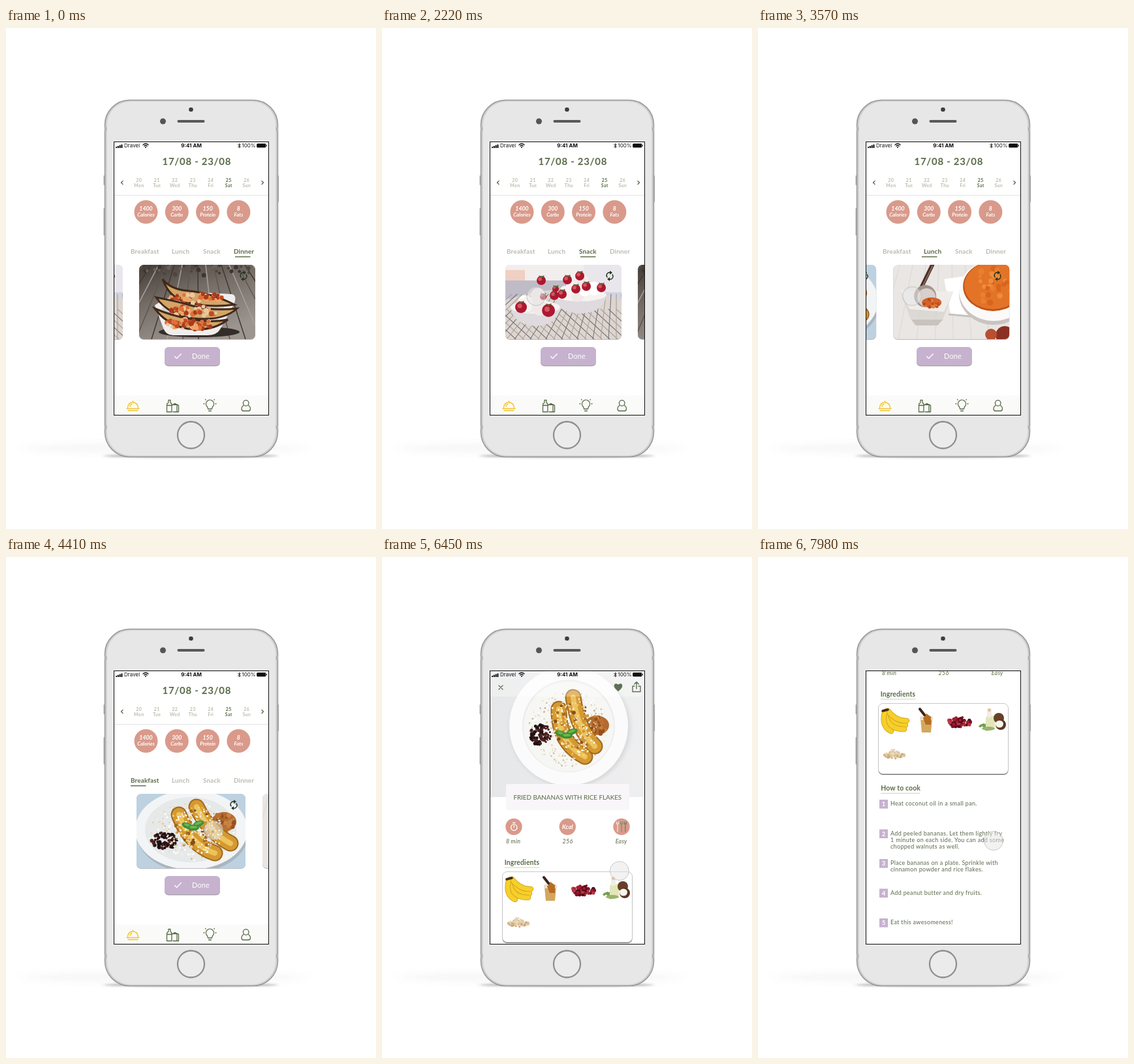
Recreate the animation shown at these times as an HTML page. Size 567 px wide and 768 px high, loop 8 s.

```html
<!DOCTYPE html>
<html lang="en">
<head>
<meta charset="utf-8">
<title>Meal planner</title>
<style>
html, body { margin: 0; height: 100%; overflow: hidden; background: #fff; }
svg { display: block; font-family: Lato, sans-serif; fill: none; }
text { fill: #586a46; white-space: pre; }
.mid { text-anchor: middle; }
.bar { font: 8px Inter, sans-serif; fill: #111; }
.b { font-weight: 700; }
.i { font-style: italic; }
.pale { fill: #b9beb0; }
.white { fill: #fff; }
.title { font-size: 15px; letter-spacing: .7px; }
.day { font-size: 7px; letter-spacing: .3px; }
.tab { font-size: 10px; letter-spacing: .1px; }
.step { font-size: 9px; letter-spacing: .32px; fill: #59684a; }
.head { font-size: 10.4px; letter-spacing: .15px; }
.line { stroke: #586a46; stroke-width: 1.3; stroke-linecap: round; stroke-linejoin: round; }
</style>
</head>
<body>
<svg id="stage" width="567" height="768" viewBox="0 0 567 768"></svg>
<script>
let seed = 7;
const rnd = () => (seed = seed * 16807 % 2147483647) / 2147483647;

// Markup helpers
const text = (x, y, s, cls = '', more = '') => `<text x="${x}" y="${y}" class="${cls}" ${more}>${s}</text>`;
const path = (d, fill, more = '') => `<path d="${d}" fill="${fill}" ${more}/>`;
const curve = (d, color, w) => `<path d="${d}" stroke="${color}" stroke-width="${w}" stroke-linecap="round" stroke-linejoin="round"/>`;
const oval = (x, y, rx, ry, fill, more = '') => `<ellipse cx="${x}" cy="${y}" rx="${rx}" ry="${ry}" fill="${fill}" ${more}/>`;
const disc = (x, y, r, fill, more) => oval(x, y, r, r, fill, more);
const rect = (x, y, w, h, fill, r = 0, more = '') => `<rect x="${x}" y="${y}" width="${w}" height="${h}" rx="${r}" fill="${fill}" ${more}/>`;
const group = (id, s, more = '') => `<g id="${id}" ${more}>${s}</g>`;
const repeat = (n, fn) => Array.from({ length: n }, (_, i) => fn(i)).join('');
const scatter = (n, x, y, rx, ry, r, ...colors) => repeat(n, () => {
  const a = rnd() * 6.283, d = Math.sqrt(rnd());
  return disc((x + Math.cos(a) * d * rx).toFixed(1), (y + Math.sin(a) * d * ry).toFixed(1),
    (r * (.6 + rnd() * .6)).toFixed(1), colors[rnd() * colors.length | 0]);
});

// Banana dish, shared by the card and the recipe photo
const dish = (berries, butter, mint, bananas, cx, cy, rx, ry) =>
  scatter(330, cx, cy, rx, ry, 1.3, '#e6d9c0', '#cbb896', '#fff', '#f3ecdc') +
  scatter(85, ...berries, 2.5, '#2a1414', '#4d2020', '#1d1012') +
  oval(...butter, 19, 15, '#b5692d') + scatter(40, ...butter, 17, 14, 3, '#c98344', '#95501f', '#bb7030') +
  bananas.map(d => curve(d, '#a2681f', 25) + curve(d, '#d49a31', 21) + curve(d, '#edc35b', 8)).join('') +
  scatter(55, cx + 8, cy - 3, rx * .5, ry * .7, 2.4, '#a8681f', '#8a4c18', '#cf9235', '#eec463') +
  scatter(190, cx + 5, cy, rx * .65, ry * .85, 1.3, '#fff', '#f7efd9', '#e6d6b2') +
  [[-9, 1, 20], [8, -2, -20], [0, 4, 0]].map(([x, y, a]) =>
    `<g transform="translate(${mint[0] + x} ${mint[1] + y}) rotate(${a})">${oval(0, 0, 9, 4.5, '#3f8f35')}${oval(0, -1, 6, 2, '#6cb551')}</g>`).join('');

const berry = (x, y, r = 7) => disc(x, y, r, '#ac1830') + disc(x - 2, y - 2, r * .4, '#d65560') +
  curve(`M${x - 3} ${y - r}l3 2l4-2`, '#4d7a3a', 1.5);
const bowl = (x, y, w) => path(`M${x - w} ${y}q4 27 ${w} 29q${w - 4}-2 ${w}-29z`, '#dedadd') + oval(x, y, w, 10, '#f6f2f2') +
  scatter(14, x, y - 9, w * .62, 13, 10, '#fff', '#f1e9e8', '#f7f3f1');

const photos = [
  rect(0, 0, 167, 114, '#bdd1e0') + oval(86, 59, 86, 62, '#a9b6c0') + oval(84, 55, 86, 61, '#f3f4f5') +
  oval(83, 55, 70, 50, '#e6e9e9') + dish([43, 72, 20, 13], [134, 43], [87, 48],
    ['M65 32Q82 78 120 91', 'M92 20Q112 60 144 76'], 84, 58, 66, 45),

  rect(0, 0, 178, 114, '#e9e6e3') + repeat(8, i => curve(`M${i * 28 - 20} 114L${i * 20 + 10} 0`, '#dcd7d3', 1)) +
  path('M78 22L132 14L142 80L88 76z', '#fff') + path('M85 76l57 5', 'none', 'stroke="#c8c2bd" stroke-width="3"') +
  path('M10 38L92 41L76 84L68 93H34L27 84z', '#d8d3ce', 'fill-opacity=".75"') +
  path('M10 38L92 41L78 72L25 68z', '#f4f2f0', 'fill-opacity=".8"') +
  curve('M61 -2L44 33', '#4a3027', 6) + curve('M60 2L46 31', '#876559', 2) +
  disc(49, 48, 17, '#a2958d') + disc(51, 50, 14, '#d8d0ca') + oval(59, 58, 15, 8, '#d4622b') +
  scatter(16, 59, 59, 13, 7, 2.5, '#e4813f', '#b94d1e') + path('M28 84H76L68 93H35z', '#c9c3bd') +
  disc(171, 108, 14, '#8c3023') + disc(150, 107, 9, '#b74f30') + oval(154, 45, 53, 47, '#c9c4c1') + oval(154, 40, 53, 46, '#fbfaf9') +
  oval(153, 33, 46, 38, '#bf5518') + oval(153, 32, 44, 36, '#e37327') +
  scatter(35, 153, 32, 35, 27, 4, '#ee8c3c', '#d8651d', '#e98030'),

  rect(0, 0, 178, 114, '#d3d4de') + rect(0, 0, 178, 24, '#f2eeee') + rect(0, 8, 30, 22, '#efd0c3') +
  rect(120, 0, 58, 42, '#e9e7ec') + path('M0 24H120V52H0z', '#bfbcc8') + oval(90, 84, 112, 46, '#ddd5cf') +
  repeat(26, i => curve(`M${i * 12 - 70} 114L${i * 8 + 10} 45M${i * 12 - 70} 68l50 46`, i % 2 ? '#77727a' : '#aaa09b', 1.1)) +
  bowl(114, 46, 41) + bowl(46, 65, 38) +
  [[24, 65, 9], [66, 70, 10], [55, 24], [75, 47], [87, 45], [77, 37, 5], [95, 23], [114, 17], [108, 37], [124, 33], [147, 35], [58, 49, 5]].map(b => berry(...b)).join(''),

  rect(0, 0, 178, 114, 'url(#wood)') + repeat(19, i => curve(`M${i * 24 - 125} 114L${i * 12 - 18} 0`, ['#3f3833', '#a8a19b', '#5d554f'][i % 3], 1.5)) +
  scatter(40, 90, 8, 88, 9, 3, '#3d3530', '#6a605a', '#4f4640') +
  oval(92, 103, 62, 8, '#332d2a') + path('M24 62Q50 44 88 42L142 45Q151 47 145 61L124 99Q119 108 104 108H52Q41 108 37 97z', '#f0eeed') +
  path('M34 66L135 54L117 92Q112 98 102 98H52z', '#d3cfcc') +
  ['M36 22Q48 38 76 40Q110 43 146 61Q112 66 80 59Q48 55 36 22z', 'M26 50Q54 55 82 63Q112 71 150 67Q128 87 82 82Q44 76 26 50z', 'M24 67Q52 79 82 84Q112 89 136 84Q112 103 74 98Q42 92 24 67z']
    .map((d, i) => path(d, '#d3a566', 'stroke="#40291b" stroke-width="3"') +
      scatter(50, 88 - i * 5, 51 + i * 20, 40, 8, 3.4, '#c04a22', '#df7039', '#a93a1a', '#efa467', '#e8c9a0')).join('')
];

const lefts = [200, 393, 596, 799];
const cards = photos.map((art, i) => {
  const w = i ? 178 : 167;
  return `<g transform="translate(${lefts[i]} 363)">${rect(0, .5, w, 114.5, '#bbb', 7)}<g clip-path="url(#card${i ? 1 : 0})">${art}
    <g transform="translate(${w - 18} 17)">${curve('M-4 2A4.5 4.5 0 0 1 1-5M4-2A4.5 4.5 0 0 1-1 5', '#25331f', 1.4)}
    ${path('M0-8l4 3l-4 3zM0 8l-4-3l4-3z', '#25331f')}</g></g></g>`;
}).join('');

const status = rect(166, 175, 236, 12, '#fff', 0, 'fill-opacity=".35"') +
  repeat(4, i => rect(168 + i * 2.8, 182 - i * 1.2, 2.1, 2 + i * 1.2, '#111', .4)) + text(181, 183, 'Dravel', 'bar') +
  curve('M210 179q4-3.6 8 0M211.8 181q2.2-2 4.4 0', '#111', 1.3) + disc(214, 183, 1, '#111') +
  text(284, 183, '9:41 AM', 'bar b mid') + curve('M355.5 178.5l4 3.5l-2 2v-7l2 2l-4 3.5', '#111', .8) +
  text(361.5, 183, '100%', 'bar') + rect(384.5, 177.5, 13.5, 5.5, '#111', 1, 'stroke="#111" stroke-width=".7"') + rect(399, 179, 1, 2.5, '#111');

const tabs = [['Breakfast', 191], ['Lunch', 254], ['Snack', 302], ['Dinner', 349]];
const days = 'Mon Tue Wed Thu Fri Sat Sun'.split(' ');
const facts = [['1400', 'Calories'], ['300', 'Carbs'], ['150', 'Protein'], ['8', 'Fats']];

const home = rect(165, 174, 238, 420, '#fff') + text(292.3, 210, '17/08 - 23/08', 'title b mid') +
  '<g class="line"><path d="M179 234.5l-2.5 2.5l2.5 2.5M392 234.5l2.5 2.5l-2.5 2.5"/></g>' +
  days.map((d, i) => [20 + i, d].map((s, j) => text(203.7 + i * 27.5, 236 + j * 8.3, s, 'day b mid' + (i == 5 ? '' : ' pale'))).join('')).join('') +
  rect(166, 256, 236, 1, '#e4e4e4') +
  facts.map(([n, s], i) => disc(214.5 + i * 47.3, 282, 18, '#d99a8b') +
    text(214.5 + i * 47.3, 280, n, 'b i mid white', 'font-size="8.8"') + text(214.5 + i * 47.3, 289, s, 'b i mid white', 'font-size="7.8"')).join('') +
  tabs.map(([s, x]) => text(x, 346, s, 'tab b')).join('') + rect(0, 350, 23.5, 1.4, '#586a46', 0, 'id="mark"') +
  group('cards', cards) +
  rect(243, 490, 85, 28.5, '#a7a2aa', 6) + rect(243, 489, 85, 28, '#c6b2cf', 6) + curve('M258.5 503.5l3 3l7-7', '#fff', 1.3) +
  text(285, 507, 'Done', 'white', 'font-size="11" letter-spacing=".15"') +
  rect(166, 563, 236, 31, '#fafbf9') +
  curve('M185 583.5h19M186.5 583.5q0-9.5 8-9.5t8 9.5M187 586.5h15M194.5 574v-2M190 580q1-3 3-3.5', '#f3c22c', 1.4) +
  `<g class="line"><path d="M247 588.5h7v-12l-2-2.5v-3.5h-3v3.5l-2.5 2.5v12M247 578.5h7M256 588.5h6v-11.5h-6M262.5 588.5h2v-9q0-2-2.5-2h-6q-2 0-2 2v9M257 577q1.5-2.5 3.5 0"/>
  <path d="M309.5 584q0-2.5-2-4.5a6 6 0 1 1 10 0q-2 2-2 4.5zM310.5 587h4M304 576h-1M321 576h1M306 570l-.5-.5M319 570l.5-.5"/>
  <circle cx="367.7" cy="575" r="4.3"/><path d="M364.5 578.5q-3.500 1.500-3.500 5.500q0 3 3 3h7.500q3 0 3-3q0-4-3.500-5.500"/></g>`;

const ingredients =
  ['M197 494Q205 519 226 516', 'M195 495Q196 522 224 522', 'M199 494Q212 510 228 509', 'M194 496Q189 518 204 525']
    .map(d => curve(d, '#cf9f18', 8.5) + curve(d, '#f6cf2b', 6.8)).join('') + curve('M191 494l8-2', '#3c2c19', 3.5) +
  path('M249 506h18l-2 21h-14z', '#d3a75d') + rect(248, 502, 20, 6, '#ebddc3', 2) + path('M253 505l5-7l7 5v12h-8z', '#b46d24') +
  curve('M255 500l-7-9', '#39251c', 4) +
  scatter(65, 309, 511, 18, 8, 2.7, '#7d1022', '#a31d32', '#570b18', '#b93747') +
  scatter(16, 349, 518, 9, 4, 2.5, '#437b31', '#76a252') +
  rect(349, 501, 14, 22, '#e3e6b9', 5) + rect(351, 491, 7, 13, '#f0eee5', 2) + rect(352, 490, 5, 5, '#e4c2a0', 2) +
  disc(369, 505, 8, '#674027') + disc(372, 515, 8, '#5b3420') + oval(370, 514, 6, 5.5, '#f8f5ee') + oval(353, 521, 10, 3, '#9bb36b') +
  scatter(75, 209, 562, 16, 5, 1.7, '#d9bd93', '#e9d6b6', '#c9a777') + scatter(30, 209, 557, 8, 4, 1.6, '#dec59e', '#ead9bc');

const steps = [
  ['Heat coconut oil in a small pan.'],
  ['Add peeled bananas. Let them lightly fry', '1 minute on each side. You can add some', 'chopped walnuts as well.'],
  ['Place bananas on a plate. Sprinkle with', 'cinnamon powder and rice flakes.'],
  ['Add peanut butter and dry fruits.'],
  ['Eat this awesomeness!']
];
const badge = x => disc(x, 413.5, 12.7, '#d99a8b');
const heading = (x, y, w, s) => text(x, y, s, 'head b') + rect(x, y + 3.5, w, 1, '#cdd3c2');

const recipe = rect(165, 174, 238, 720, '#fff') + rect(165, 174, 238, 194, 'url(#table)') +
  '<g clip-path="url(#hero)">' + oval(288, 262, 93, 91, '#d9dadb', 'filter="url(#blur2)"') + disc(286, 259, 91, '#fbfbfb') + disc(286, 259, 71, '#ececec') + disc(286, 260, 69, '#f6f6f4') +
  dish([243, 273, 16, 17], [329, 258], [283, 270], ['M271 233Q270 285 311 306', 'M293 215Q300 265 326 290'], 285, 263, 60, 58) + '</g>' +
  rect(166, 187, 236, 27, '#fff', 0, 'fill-opacity=".3"') + curve('M179 197l6 6M185 197l-6 6', '#586a46', 1.2) +
  path('M362 206q-7-5.500-6.300-9.500q1.500-4.500 6.300-1q4.800-3.500 6.300 1q.7 4-6.300 9.500z', '#5d7052') +
  curve('M387 198h-3v8.5h12v-8.5h-3M390 202v-10M386.5 195l3.5-3.5l3.5 3.5', '#5d7052', 1.4) +
  rect(190, 348, 189, 40, '#f8f6f9', 3) + text(284.3, 371.5, 'FRIED BANANAS WITH RICE FLAKES', 'mid', 'font-size="9.8"') +
  badge(202) + badge(284.3) + badge(367) +
  `<circle cx="202.3" cy="414.5" r="4.6" stroke="#fff" stroke-width="1.4"/>` + curve('M202.3 414.5v-2.5M200.5 407.5h3.5', '#fff', 1.3) +
  text(284.3, 417.3, 'Kcal', 'b i mid white', 'font-size="9.3"') +
  [0, 1, 2].map(i => curve(`M${361 + i * 6} 409v12M${359.5 + i * 6} 406v3h3v-3`, ['#f5ddd5', '#829273', '#71866a'][i], 1.4)).join('') +
  ['8 min', '256', 'Easy'].map((s, i) => text([201, 284.5, 366.7][i], 439, s, 'i mid', 'font-size="9" letter-spacing=".2"')).join('') +
  heading(187.7, 472, 54, 'Ingredients') +
  rect(184.5, 483, 199, 109, '#777', 7) + rect(184.5, 482.5, 199, 108, '#fff', 7, 'stroke="#bbb" stroke-width=".8"') + ingredients +
  heading(188.3, 616.3, 60, 'How to cook') +
  steps.map((lines, i) => {
    const y = 639 + i * 45.5;
    return rect(186, y - 9, 13, 13.6, '#c6b2cf') + text(192.5, y + 1.4, i + 1, 'b mid white', 'font-size="9.5"') +
      lines.map((s, j) => text(203, y + j * 10.3, s, 'step')).join('');
  }).join('');

const phone =
  oval(242, 644, 215, 9, '#777', 'fill-opacity=".06" filter="url(#blur)"') + oval(283, 656, 134, 3, '#444', 'fill-opacity=".35" filter="url(#blur2)"') +
  rect(149.5, 226, 4, 15, '#aaa', 1) + rect(149.5, 276, 4, 42, '#aaa', 1) + rect(415, 226, 3, 41, '#aaa', 1) +
  rect(151.5, 110.5, 265, 547, '#cbcbcb', 38, 'stroke="#9a9a9a" stroke-width="1.5"') +
  rect(154.5, 112.5, 259, 543, '#e7e7e7', 36, 'stroke="#d9d9d9"') +
  [152, 609].map(y => rect(151, y, 3.5, 6, '#b5b5b5') + rect(413.5, y, 3.5, 6, '#b5b5b5')).join('') +
  disc(283.5, 125, 3.3, '#3d3d3f') + disc(240.5, 143, 4.5, '#555558') + rect(262.5, 141, 42, 4, '#59595b', 2) +
  disc(283.5, 624, 20.5, '#eee', 'stroke="#8f8f8f" stroke-width="2.3"') + disc(283.5, 624, 18.5, '#ebebeb');

const $ = id => document.getElementById(id);
$('stage').innerHTML = `<defs>
  <linearGradient id="wood" x2=".5" y2="1"><stop stop-color="#423a35"/><stop offset=".45" stop-color="#756c66"/><stop offset="1" stop-color="#9c958f"/></linearGradient>
  <linearGradient id="table" x2="1"><stop stop-color="#e6e7e8"/><stop offset="1" stop-color="#efeff0"/></linearGradient>
  <filter id="blur" x="-20%" y="-100%" width="140%" height="300%"><feGaussianBlur stdDeviation="12 4"/></filter>
  <filter id="blur2" x="-20%" y="-100%" width="140%" height="300%"><feGaussianBlur stdDeviation="3 1.5"/></filter>
  <clipPath id="screen"><rect x="165" y="174" width="238" height="420"/></clipPath>
  <clipPath id="hero"><rect x="165" y="174" width="238" height="194"/></clipPath>
  <clipPath id="card0"><rect width="167" height="114" rx="7"/></clipPath>
  <clipPath id="card1"><rect width="178" height="114" rx="7"/></clipPath>
</defs>` + phone +
  `<g clip-path="url(#screen)">${group('home', home) + group('recipe', recipe) + group('status', status)}
  <circle id="touch" r="14.5" fill="#e6e6e6" fill-opacity=".5" stroke="#b4b4b4" stroke-opacity=".7"/></g>` +
  rect(165.5, 174.5, 237, 419, 'none', 0, 'stroke="#111"');

// Motion
const clamp = v => Math.min(1, Math.max(0, v));
const ease = p => p < .5 ? 4 * p ** 3 : 1 - 4 * (1 - p) ** 3;
const lerp = (a, b, p) => a + (b - a) * p;
const at = (t, keys) => {
  const n = keys.findIndex(k => k[0] > t);
  if (n < 0) return keys[keys.length - 1].slice(1);
  if (!n) return keys[0].slice(1);
  const a = keys[n - 1], b = keys[n], p = ease((t - a[0]) / (b[0] - a[0]));
  return a.slice(1).map((v, i) => lerp(v, b[i + 1], p));
};
const along = (stops, v) => lerp(stops[Math.floor(v)], stops[Math.ceil(v)], v % 1);

const swipes = [[1080, 3], [1890, 2], [2190, 2], [3000, 1], [3540, 1], [4050, 0]];
const touches = [[240, 386, 197], [630, 236, 411], [1080, 236, 411], [1500, 360, 411], [1890, 236, 411],
  [2190, 236, 411], [2610, 375, 411], [3000, 236, 411], [3540, 236, 411], [4050, 318, 419],
  [5160, 318, 419], [5610, 280, 416], [5850, 280, 416], [6660, 370, 486]];
const labels = [...document.querySelectorAll('.tab')];

function draw(t) {
  const meal = at(t, swipes)[0];
  $('cards').setAttribute('transform', `translate(${-along([0, 186, 407, 595], meal)} 0)`);
  $('mark').setAttribute('x', along([191, 251, 304, 351], meal));
  labels.forEach((el, i) => el.classList.toggle('pale', i != Math.round(meal)));

  // Fling past the end of the page, then spring back
  const pull = 288 * clamp((t - 6690) / 780) ** 2;
  const back = 1 - (1 - clamp((t - 7470) / 450)) ** 3;
  const scroll = pull - 30 * back;
  for (const id of ['recipe', 'status']) $(id).setAttribute('transform', `translate(0 ${-scroll})`);
  $('recipe').setAttribute('opacity', t < 4950 ? 0 : t < 5010 ? .5 : 1);

  let [x, y] = at(t, touches);
  if (t > 6690) {
    y -= pull * 1.15;
    [x, y] = at(t, [[7470, x, y], [7980, 361, 435]]);
  }
  const press = t > 4410 && t < 4650 ? 1 - .15 * Math.sin((t - 4410) / 240 * Math.PI) : 1;
  $('touch').setAttribute('transform', `translate(${x} ${y}) scale(${press})`);
  $('touch').setAttribute('opacity', clamp((t - 230) / 90));
}

const start = performance.now();
function tick() {
  draw((performance.now() - start) % 8000);
  requestAnimationFrame(tick);
}
tick();
</script>
</body>
</html>
```
